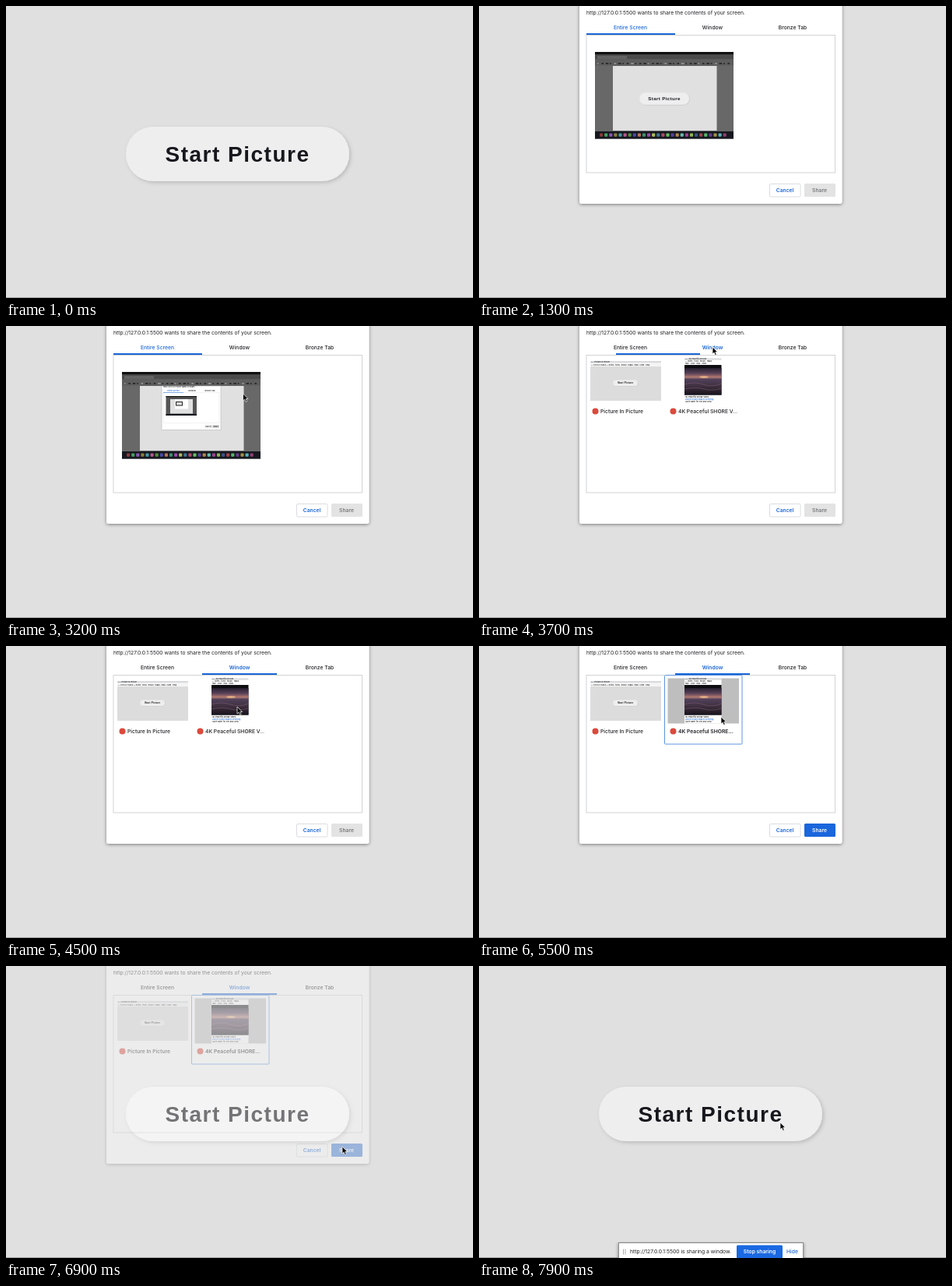
An HTML page that plays this animation: 600x375 px, repeating every 8 s.

```html
<!DOCTYPE html>
<html lang="en">
<head>
<meta charset="utf-8">
<title>Start Picture</title>
<style>
html, body { margin: 0; width: 100%; height: 100%; overflow: hidden; background: #e0e0e0; }
svg { display: block; width: 100%; height: 100%; }
text { font: 500 6.75px Inter, "Open Sans", sans-serif; fill: #202124; }
.mid { text-anchor: middle; }
.bold { font-weight: 600; }
.blue { fill: #1a66d6; }
.white { fill: #fff; }
.label { font: bold 28px "Liberation Sans", Arial, sans-serif; letter-spacing: 1.5px; fill: #17181d; }
.tiny { font-size: 2.4px; }
</style>
</head>
<body>
<svg viewBox="0 0 600 375">
  <defs>
    <filter id="soft" x="-10%" y="-20%" width="120%" height="150%">
      <feDropShadow dx="2" dy="2" stdDeviation="2.5" flood-opacity=".17"/>
    </filter>
    <filter id="lift" x="-5%" y="-5%" width="110%" height="115%">
      <feDropShadow dx="0" dy="1" stdDeviation="2" flood-opacity=".45"/>
    </filter>
    <linearGradient id="dusk" x2="0" y2="1">
      <stop stop-color="#251e30"/>
      <stop offset=".2" stop-color="#5a4258"/>
      <stop offset=".34" stop-color="#b27a70"/>
      <stop offset=".42" stop-color="#51405a"/>
      <stop offset=".7" stop-color="#3d2e3c"/>
      <stop offset="1" stop-color="#16121c"/>
    </linearGradient>
    <g id="pill">
      <rect x="154" y="155" width="287" height="70" rx="35" fill="#eee" filter="url(#soft)"/>
      <text class="label" x="204.5" y="199.5">Start Picture</text>
    </g>
  </defs>

  <rect width="600" height="375" fill="#e0e0e0"/>
  <rect y="374" width="600" height="1" fill="#a2a2a2"/>
  <use id="start" href="#pill"/>

  <g id="dialog">
    <rect x="129" y="-10" width="337.5" height="264" rx="3" fill="#fff" filter="url(#lift)"/>
    <text x="138" y="11.3" style="font-weight:400">http://127.0.0.1:5500 wants to share the contents of your screen.</text>
    <text id="tabScreen" class="mid" x="194.5" y="30.2">Entire Screen</text>
    <text id="tabWindow" class="mid" x="300" y="30.2">Window</text>
    <text class="mid" x="403" y="30.2">Bronze Tab</text>
    <rect x="138" y="37.5" width="319.5" height="176.5" fill="#fff" stroke="#d2d3d5"/>
    <rect id="line" y="35" height="2" fill="#1a66d6"/>

    <g id="screen">
      <rect x="149" y="59" width="178" height="111.5" fill="#686868"/>
      <rect x="149" y="59" width="178" height="3.5" fill="#111"/>
      <rect x="149" y="62.5" width="178" height="6" fill="#4b4b4b"/>
      <rect x="149" y="68.5" width="178" height="8" fill="#5d5d5d"/>
      <rect x="152" y="64" width="38" height="4" fill="#626262"/>
      <g id="bits"></g>
      <rect x="172" y="77" width="133.5" height="83" fill="#e0e0e0"/>
      <rect x="149" y="161" width="178" height="9.5" fill="#16181f"/>
      <g id="dock"></g>
      <use id="smallPill" href="#pill" transform="translate(171.7 76.6) scale(.223)"/>
      <g id="nested">
        <rect x="200" y="77" width="76" height="56.5" fill="#fff" stroke="#aaa" stroke-width=".5"/>
        <text class="tiny" x="202" y="79.4">http://127.0.0.1:5500 wants to share</text>
        <text class="tiny blue mid" x="215" y="84">Entire Screen</text>
        <text class="tiny mid" x="239" y="84">Window</text>
        <text class="tiny mid" x="262" y="84">Bronze Tab</text>
        <rect x="202" y="85.5" width="72" height="39" fill="none" stroke="#ddd" stroke-width=".4"/>
        <rect x="202" y="85.2" width="26" height=".5" class="blue"/>
        <rect x="205.5" y="90" width="39.5" height="25" fill="#555"/>
        <rect x="205.5" y="90" width="39.5" height="1.2" fill="#111"/>
        <rect x="205.5" y="113" width="39.5" height="2" fill="#16181f"/>
        <rect x="211" y="94" width="29" height="18.5" fill="#e0e0e0"/>
        <rect x="217" y="94" width="17" height="12.5" fill="#fff"/>
        <rect x="218.5" y="97.5" width="8" height="4.5" fill="#ddd" stroke="#222"/>
        <rect x="256" y="127" width="8" height="4" fill="#fff" stroke="#ccc" stroke-width=".4"/>
        <rect x="265" y="127" width="9" height="4" fill="#ddd"/>
        <text class="tiny mid" x="260" y="130">Cancel</text>
        <text class="tiny mid" x="269.5" y="130">Share</text>
      </g>
    </g>

    <g id="windows">
      <rect x="143" y="45" width="91" height="51" fill="#dcdcdc"/>
      <rect x="143" y="45" width="91" height="7" fill="#f5f5f5"/>
      <rect x="143" y="45" width="91" height="2.2" fill="#d8dadd"/>
      <text class="tiny" x="144" y="47.1">••• Picture In Picture</text>
      <text class="tiny" x="144" y="51.2">‹ › 127.0.0.1:5500 — notes · tools · music · maps · mail · code · help</text>
      <use href="#pill" transform="translate(155.4 52.3) scale(.11)"/>
      <circle cx="149.5" cy="109.5" r="4" fill="#dc4a3c"/>
      <text x="156" y="111.8">Picture In Picture</text>

      <g id="card">
        <rect x="238.5" y="37.5" width="99.5" height="88.5" rx="1" fill="#fff" stroke="#5e94e2"/>
        <rect x="242.5" y="41.5" width="91.5" height="58" fill="#bebebe"/>
      </g>
      <rect x="264" y="41.5" width="47.5" height="58" fill="#fff"/>
      <rect x="264" y="41.5" width="47.5" height="2" fill="#d8dadd"/>
      <text class="tiny" x="265" y="43.3">••• 4K Peaceful SHORE</text>
      <text class="tiny" x="265" y="46.3">‹ › notes · tools · music · maps</text>
      <text class="tiny" x="265" y="49.2">mail · code · help · news</text>
      <rect x="264" y="50" width="47.5" height="38.5" fill="#0d0c10"/>
      <rect x="264" y="54" width="47.5" height="34.5" fill="url(#dusk)"/>
      <ellipse cx="289" cy="65.5" rx="6" ry="1.5" fill="#f3bd8b" opacity=".75"/>
      <path d="M264 75q12-4 24 0t23.500-1M264 81q14-3 25 0t22.500-1" fill="none" stroke="#85647a" stroke-width=".8" opacity=".6"/>
      <text class="tiny bold" x="265" y="91.500">4K Peaceful SHORE Video</text>
      <text class="tiny blue" x="265" y="94.500">#shore #calm #waves #evening</text>
      <text class="tiny" x="265" y="98">Quiet water for rest and sleep</text>
      <circle cx="249.500" cy="109.500" r="4" fill="#dc4a3c"/>
      <text id="title" x="256" y="111.800"></text>
    </g>

    <rect x="373.500" y="228.500" width="39.500" height="16.500" rx="1.500" fill="#fff" stroke="#dadce0"/>
    <text class="mid bold blue" x="393" y="239">Cancel</text>
    <rect id="shareBox" x="418" y="228" width="40" height="17" rx="1.500"/>
    <text id="share" class="mid bold" x="437.500" y="239">Share</text>
  </g>

  <g id="bar">
    <rect x="179.500" y="355.500" width="237" height="24" fill="#fff" stroke="#8c8c8c" filter="url(#lift)"/>
    <path d="M185.500 363.500v7M188 363.500v7" stroke="#a9abad" stroke-width="1"/>
    <text x="194" y="369.300" style="font-weight:400">http://127.0.0.1:5500 is sharing a window.</text>
    <rect x="331" y="358.500" width="59" height="17" rx="1.500" fill="#1a69e2"/>
    <text class="mid bold white" x="360.500" y="369.300">Stop sharing</text>
    <text class="mid blue" x="402.500" y="369.300">Hide</text>
  </g>

  <path id="cursor" d="M0 0v9l2.100-1.900 1.400 3.300 1.700-.7-1.400-3.200h2.800z" fill="#000" stroke="#fff" stroke-width=".7"/>
</svg>

<script>
const $ = id => document.getElementById(id);
const show = (id, on) => $(id).style.display = on ? "" : "none";
const lerp = (a, b, k) => a + (b - a) * k;

// time, x, y of the pointer tip
const path = [
  [1800, 330, 225], [2700, 308, 110], [3200, 304.500, 87], [3400, 304, 80],
  [3700, 300, 27], [4300, 299, 28], [4500, 297, 78], [4600, 298, 81],
  [5400, 298, 81], [5500, 311, 91], [5700, 411, 233], [6000, 411, 233],
  [6400, 432, 232], [7700, 432, 232], [7900, 387, 201]
];

function pointer(t) {
  const i = path.findIndex(p => p[0] >= t);
  if (i < 1) return path[0].slice(1);
  const [a, b] = [path[i - 1], path[i]];
  const k = (t - a[0]) / (b[0] - a[0]);
  return [lerp(a[1], b[1], k), lerp(a[2], b[2], k)];
}

function addRects(id, count, make) {
  for (let i = 0; i < count; i++) {
    const r = document.createElementNS("http://www.w3.org/2000/svg", "rect");
    for (const [name, value] of Object.entries(make(i))) r.setAttribute(name, value);
    $(id).append(r);
  }
}
addRects("dock", 27, i => ({
  x: 155 + i * 6.1, y: 163.500, width: 4.200, height: 4.200, rx: 1,
  fill: `hsl(${i * 137 % 360} 40% ${38 + i * 7 % 20}%)`
}));
addRects("bits", 32, i => ({
  x: 152 + i * 5.4, y: 73, width: 1.500 + i * 7 % 3, height: 1.600,
  fill: i % 4 ? "#222" : "#999"
}));

function draw(now) {
  const t = Math.floor(now % 8000 / 100) * 100;
  const open = t >= 1300 && t < 7000;
  const onWindow = t >= 3700;
  const chosen = t >= 5000;
  const [x, y] = pointer(t);
  const hover = chosen && x > 418;

  show("dialog", open);
  $("dialog").setAttribute("opacity", t === 6900 ? .4 : 1);
  show("start", !open || t === 6900);
  show("screen", !onWindow);
  show("windows", onWindow);
  show("smallPill", t < 1500);
  show("nested", t >= 1500);
  show("card", chosen);
  show("bar", t >= 7000);
  show("cursor", t >= 1900);

  const slide = Math.min(1, Math.max(0, (t - 3600) / 300));
  $("line").setAttribute("x", lerp(138, 252, slide));
  $("line").setAttribute("width", lerp(114, 96, slide));
  $("tabScreen").setAttribute("class", onWindow ? "mid" : "mid blue");
  $("tabWindow").setAttribute("class", onWindow ? "mid blue bold" : "mid");
  $("title").setAttribute("class", chosen ? "bold" : "");
  $("title").textContent = chosen ? "4K Peaceful SHORE..." : "4K Peaceful SHORE V...";
  $("shareBox").setAttribute("fill", !chosen ? "#e3e3e3" : hover ? "#3674d6" : "#1a66dc");
  $("share").style.fill = chosen ? "#fff" : "#77797c";
  $("cursor").setAttribute("transform", `translate(${x} ${y})`);
}

const began = performance.now();
function tick() {
  draw(performance.now() - began);
  requestAnimationFrame(tick);
}
tick();
</script>
</body>
</html>
```
